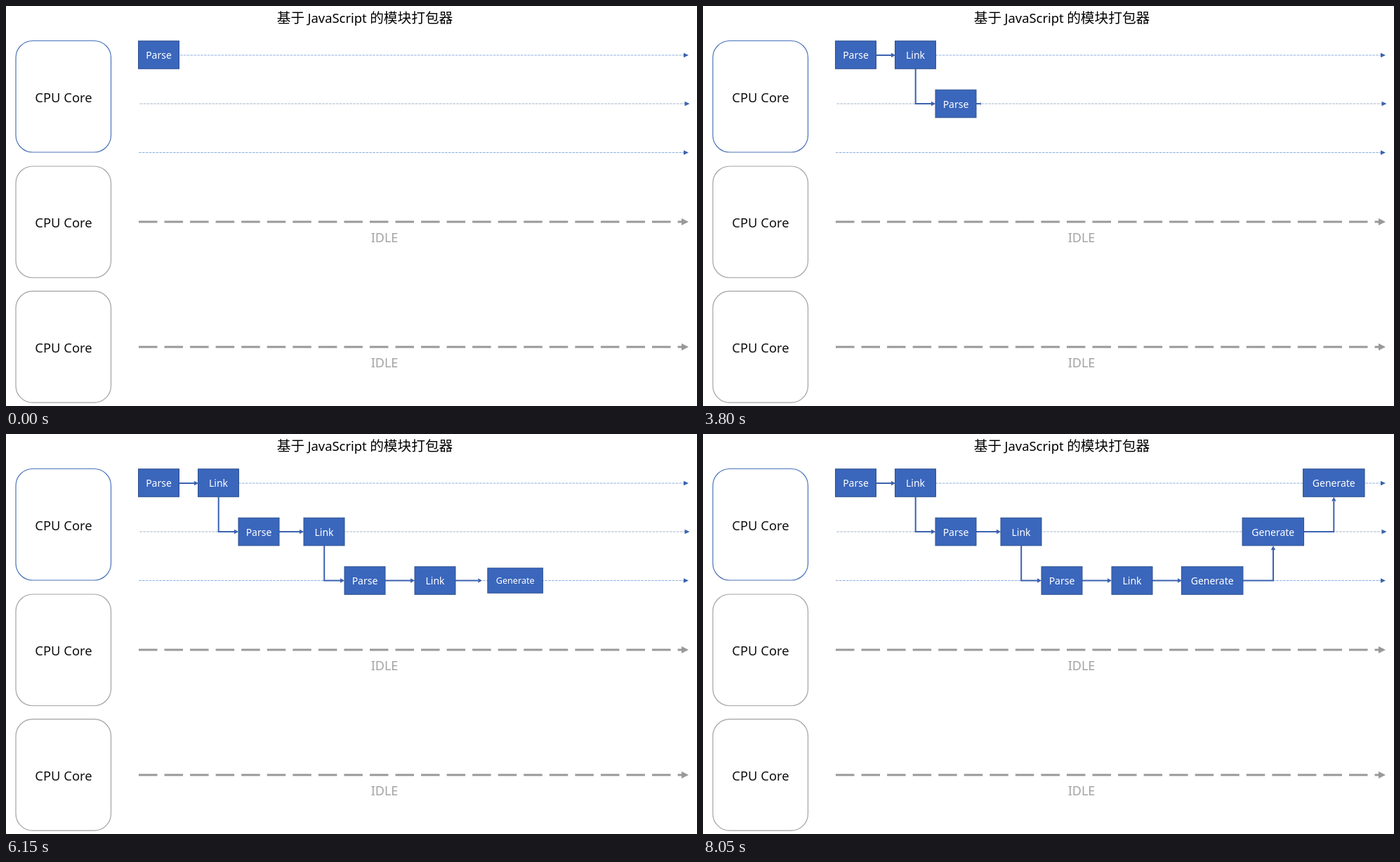
Recreate the animation shown at these times as an HTML page. Size 984 by 569 pixels, loop 8.3 s.

```html
<!DOCTYPE html>
<html lang="zh">
<head>
<meta charset="utf-8">
<style>
  html, body { margin: 0; width: 100%; height: 100%; overflow: hidden; background: #fff; }
  svg { display: block; width: 984px; height: 569px; }
  text { font-family: "Noto Sans", "Noto Sans CJK SC", sans-serif; text-anchor: middle; }
  .title { font: 19.7px "Noto Sans CJK SC", "Noto Sans", sans-serif; }
  .title tspan { font: 18.4px "Noto Sans", sans-serif; }
  .core { font-size: 18.4px; fill: #111; }
  .idle { font-size: 18px; fill: #a3a3a3; }
  .box rect { fill: #3a66bc; stroke: #2f528f; stroke-width: 1; }
  .box text { font-size: 14px; fill: #fff; }
  .link path { fill: none; stroke: #3b62b0; stroke-width: 2; }
  .link polygon, .tip { fill: #3b62b0; }
</style>
</head>
<body>
<svg id="stage" viewBox="0 0 984 569">
  <text class="title" x="511" y="24">基于 <tspan>JavaScript</tspan> 的模块打包器</text>
  <g id="base"></g>
  <g id="flow"></g>
  <g id="tools" fill="none" stroke="#a6a6a6">
    <path d="M-1 569 L6 561.5" stroke="#777" stroke-width="4"/>
    <circle cx="18.5" cy="567" r="6.5" fill="#fff"/>
    <rect x="15" y="565" width="7" height="6" rx="1"/>
    <circle cx="36" cy="567" r="6.5" fill="#fff"/>
    <path d="M32.5 567.5h7" stroke="#888" stroke-width="1.6" stroke-dasharray="1.6 1.1"/>
    <path d="M47.5 564h6v-3.5l7 7-7 7V571h-6z" fill="#777" stroke="none"/>
  </g>
</svg>
<script>
const LOOP = 8300, STEP = 50, GROW = 500;
const $ = id => document.getElementById(id);

function add(parent, tag, attrs, text) {
  const el = document.createElementNS("http://www.w3.org/2000/svg", tag);
  for (const k in attrs) el.setAttribute(k, attrs[k]);
  if (text) el.textContent = text;
  parent.appendChild(el);
  return el;
}

function drawBase() {
  const base = $("base");
  [49.5, 228, 405.7].forEach((y, i) => {
    add(base, "rect", { x: 14, y, width: 135.5, height: 158.5, rx: 24, fill: "none",
      stroke: i ? "#a3a3a3" : "#4a72b8", "stroke-width": 1.2 });
    add(base, "text", { class: "core", x: 82, y: y + 87 }, "CPU Core");
  });
  [[189, 70], [190.5, 139], [189, 208.5]].forEach(([x, y], i) => {
    const end = i === 1 ? 973.5 : 972;
    add(base, "path", { d: `M${x} ${y}H${end - 6}`, stroke: i === 1 ? "#a5b3c9" : "#8fb0e0",
      "stroke-width": 1.1, "stroke-dasharray": "3.6 1.3" });
    add(base, "polygon", { class: "tip", points: `${end - 7},${y - 3.3} ${end},${y} ${end - 7},${y + 3.3}` });
  });
  [307, 485].forEach(y => {
    add(base, "path", { d: `M189 ${y}H963`, stroke: "#999", "stroke-width": 3, "stroke-dasharray": "26.5 10.05" });
    add(base, "polygon", { fill: "#999", points: `962,${y - 5} 972,${y} 962,${y + 5}` });
    add(base, "text", { class: "idle", x: 539, y: y + 29 }, "IDLE");
  });
}

// label, centre x, centre y, start
const boxes = [
  ["Parse", 217.5, 69.5, -GROW],
  ["Link", 302.5, 69.5, 2200],
  ["Parse", 360, 139, 3200],
  ["Link", 453, 139, 4200],
  ["Parse", 511, 208.5, 4700],
  ["Link", 611, 208.5, 5200],
  ["Generate", 725.2, 208.5, 5700],
  ["Generate", 811.8, 139, 6200],
  ["Generate", 898.3, 69.5, 6700]
];

// start, stretch axis, points
const links = [
  [1700, "x", [247, 70], [274, 70]],
  [2700, "y", [302.7, 89.5], [302.7, 139], [331, 139]],
  [3700, "x", [389, 139], [424, 139]],
  [4700, "x", [453.2, 159], [453.2, 208.5], [482, 208.5]],
  [5200, "x", [540, 208.5], [582, 208.5]],
  [5700, "x", [640, 208.5], [682, 208.5]],
  [6200, "x", [769, 208.5], [812, 208.5], [812, 159]],
  [6700, "x", [855, 139], [898.3, 139], [898.3, 89.5]]
];

function makeBox([label, x, y, start]) {
  const w = label === "Generate" ? 87.5 : 58, h = 39.5;
  const el = add($("flow"), "g", { class: "box" });
  add(el, "rect", { x: x - w / 2, y: y - h / 2, width: w, height: h });
  add(el, "text", { x, y: y + 5.5 }, label);
  return { el, x, y, start, axis: "xy" };
}

function makeLink([start, axis, ...pts]) {
  const el = add($("flow"), "g", { class: "link" });
  const [ex, ey] = pts[pts.length - 1], [px, py] = pts[pts.length - 2];
  const dx = Math.sign(ex - px), dy = Math.sign(ey - py);
  const bx = ex - dx * 6, by = ey - dy * 6;
  add(el, "path", { d: "M" + [...pts.slice(0, -1), [bx, by]].join("L") });
  add(el, "polygon", { points: [[ex, ey], [bx - dy * 3.2, by + dx * 3.2], [bx + dy * 3.2, by - dx * 3.2]].join(" ") });
  return { el, x: pts[0][0], y: pts[0][1], start, axis };
}

const clamp = v => Math.max(0, Math.min(1, v));

function pose(part, t) {
  const p = clamp((t - part.start) / GROW);
  const sx = part.axis.includes("x") ? p : 1, sy = part.axis.includes("y") ? p : 1;
  part.el.style.display = p ? "" : "none";
  part.el.setAttribute("transform",
    `translate(${part.x} ${part.y}) scale(${sx} ${sy}) translate(${-part.x} ${-part.y})`);
}

drawBase();
const parts = [...links.map(makeLink), ...boxes.map(makeBox)];
const begin = performance.now();

function frame() {
  const now = Math.max(0, performance.now() - begin) % LOOP;
  const t = Math.floor(now / STEP) * STEP;
  parts.forEach(part => pose(part, t));
  $("tools").style.opacity = clamp((t - 850) / 200) * clamp((2050 - t) / 200);
  requestAnimationFrame(frame);
}
frame();
</script>
</body>
</html>
```
